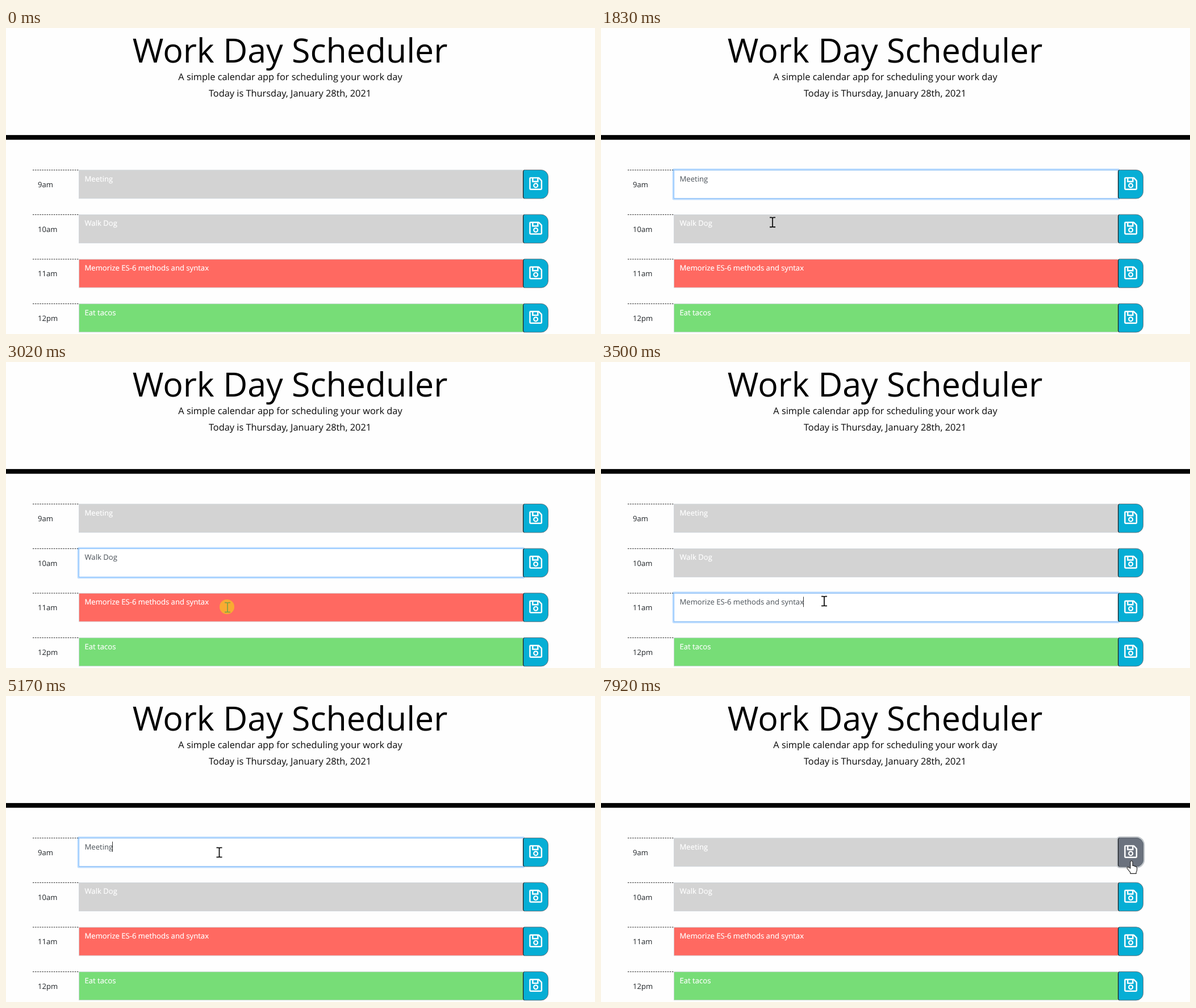
Write an HTML page that moves like this. It is 1037 px wide and 540 px high and loops after 7.99 s.

```html
<!DOCTYPE html>
<html lang="en">
<head>
<meta charset="utf-8">
<title>Work Day Scheduler</title>
<style>
  html, body { margin: 0; width: 100%; height: 100%; overflow: hidden; background: #fefefe; }
  svg { display: block; width: 1037px; height: 540px; }
  text { font-family: "Open Sans", "Noto Sans", sans-serif; font-size: 13.1px; text-rendering: geometricPrecision; }
  .head { text-anchor: middle; font-size: 16.38px; fill: #080808; }
  .title { font-size: 59px; fill: #000; }
  .hour { fill: #212529; }
  .task { stroke-width: .2; }
  .dash { stroke: #222; stroke-dasharray: 2.5 1.6; }
  .focus { fill: none; stroke: #80bdff; }
  .focus .ring { stroke: #007bff; stroke-opacity: .25; stroke-width: 2.6; }
  .box { stroke: #ced4da; stroke-width: .8; }
  .caret { fill: #333; }
  .btn { fill: #06aed5; stroke: #5f6b75; stroke-width: .9; }
  .hover { fill: #6b727e; stroke: #5f6670; stroke-width: .9; }
  .btnRing { fill: none; stroke: #bfc3c8; stroke-width: 5.6; }
  .edge { fill: none; stroke: #111; }
  .icon { fill: none; stroke: #fff; stroke-width: 48; }
  .beam { fill: none; stroke: #111; stroke-width: 1.8; }
  .hand, .arrow { fill: #fff; stroke: #222; stroke-width: 1.1; stroke-linejoin: round; }
</style>
</head>
<body>
<svg viewBox="0 0 1037 540">
  <defs>
    <path id="button" d="M913.4 0H942.2a12.3 12.3 0 0 1 12.3 12.3V38.2a12.3 12.3 0 0 1-12.3 12.3H913.4a2.6 2.6 0 0 1-2.6-2.6V2.6A2.6 2.6 0 0 1 913.4 0z"/>
    <g id="disk" class="icon" transform="translate(921.2 11) scale(.0512)">
      <path d="M48 56H316a24 24 0 0 1 17 7l84 84a24 24 0 0 1 7 17V432a24 24 0 0 1-24 24H48a24 24 0 0 1-24-24V80a24 24 0 0 1 24-24z"/>
      <path d="M120 56V184H296V56"/>
      <circle cx="224" cy="320" r="68" stroke-width="42"/>
    </g>
  </defs>
  <text class="head title" x="500" y="60.5">Work Day Scheduler</text>
  <text class="head" x="500.5" y="91.8">A simple calendar app for scheduling your work day</text>
  <text class="head" x="500" y="120.6">Today is Thursday, January 28th, 2021</text>
  <rect y="188.9" width="1037" height="8.3"/>
  <g id="rows"></g>
  <g id="cursor">
    <circle cx="-1" cy="-1" r="13" fill="#f9ab32"/>
    <path class="beam" d="M-5-8.4H-2Q0-8.4 0-7Q0-8.4 2-8.4H5M0-8V8M-5 8.4H-2Q0 8.4 0 7Q0 8.4 2 8.4H5"/>
    <path class="hand" d="M-2 2a2 2 0 0 1 4 0V8.5q2.8-.6 3.3 1q2-.4 2.5.9q1.8 0 1.8 2V16q0 2-1.4 4V22.4H-2V20.4L-6.8 14.5q-2-2.2-.4-3.4q1.6-1 5.2 2z"/>
    <path class="arrow" d="M0 0V16l3.8-3.5 2.6 6 2.4-1-2.6-5.8H11z"/>
  </g>
</svg>
<script>
const LOOP = 7990, STEP = 77, FADE = 150, BLINK = 525;
const TOP = 250.5, PITCH = 78.65, HEIGHT = 50.5, LEFT = 128, RIGHT = 910.5, BUTTON_END = 954.5;

const rows = [
  { hour: '9am', task: 'Meeting', color: '#d3d3d3' },
  { hour: '10am', task: 'Walk Dog', color: '#d3d3d3' },
  { hour: '11am', task: 'Memorize ES-6 methods and syntax', color: '#ff6961' },
  { hour: '12pm', task: 'Eat tacos', color: '#77dd77' }
];
const entry = { x: 984, y: 467 };
const moves = [
  { start: 470, end: 700, x: 328, y: 257 },
  { start: 880, end: 1830, x: 302, y: 343 },
  { start: 2130, end: 2690, x: 390, y: 433 },
  { start: 3070, end: 3500, x: 393, y: 422 },
  { start: 3500, end: 4120, x: 375.5, y: 276 },
  { start: 6380, end: 7070, x: 893, y: 290 },
  { start: 7180, end: 7500, x: 934, y: 291 }
];
const clicks = [
  { time: 1110, row: 0 }, { time: 2205, row: 1 }, { time: 3070, row: 2 },
  { time: 4120, row: 0 }, { time: 7660, save: 0 }
];

const clamp = v => Math.max(0, Math.min(1, v));
const ease = v => { const p = clamp(v); return p * p * (3 - 2 * p); };
const fade = (t, start) => ease((t - start) / FADE);
const $ = id => document.getElementById(id);
const show = (node, opacity) => { node.style.opacity = +opacity; };

$('rows').innerHTML = rows.map(({ hour, task }, i) => `
  <g transform="translate(0 ${TOP + i * PITCH})">
    <path class="dash" d="M47 .2H127.5"/>
    <text class="hour" x="56" y="30.5">${hour}</text>
    <rect class="box" x="128.4" y=".3" width="782" height="50"/>
    <g class="focus">
      <rect class="ring" x="126.9" y="-1.2" width="785" height="53" rx="1"/>
      <rect x="128.4" y=".3" width="782" height="50"/>
    </g>
    <text class="task" x="138.5" y="20.1">${task}</text>
    <rect class="caret" y="6.5" width="1" height="18"/>
    <use href="#button" class="btnRing"/>
    <use href="#button" class="btn"/>
    <use href="#button" class="hover"/>
    <path class="edge" d="M912.3 .2Q910.6 .8 910.6 3V47.5Q910.6 49.7 912.3 50.3"/>
    <use href="#disk"/>
  </g>`).join('');

const parts = [...$('rows').children].map(node => {
  const part = name => node.querySelector('.' + name);
  part('caret').setAttribute('x', Math.floor(138.5 + part('task').getComputedTextLength() - .5));
  return part;
});
const [spot, beam, hand, arrow] = $('cursor').children;

// The pointer advances in discrete steps counted from the start of each move.
function pointerAt(t) {
  const i = moves.findLastIndex(m => m.start <= t);
  if (i < 0) return null;
  const from = moves[i - 1] || entry, { start, end, x, y } = moves[i];
  const elapsed = Math.floor((t - start) / STEP) * STEP;
  const p = ease((elapsed + 3) / (end - start));
  const at = { x: from.x + (x - from.x) * p, y: from.y + (y - from.y) * p };
  const inRow = at.y > TOP && (at.y - TOP) % PITCH < HEIGHT;
  at.overText = inRow && at.x > LEFT && at.x <= RIGHT;
  at.overButton = inRow && at.x > RIGHT && at.x < BUTTON_END;
  return at;
}

function drawRow(part, i, t) {
  const latest = clicks.findLastIndex(c => c.time <= t);
  const current = clicks[latest];
  const active = current?.row === i;
  const wasActive = clicks[latest - 1]?.row === i;
  const saved = current?.save === i;
  const glow = active ? fade(t, current.time) : wasActive ? 1 - fade(t, current.time) : 0;
  const blinkOn = active && Math.floor((t - current.time + 45) / BLINK) % 2 === 0;

  part('box').style.fill = active ? '#fff' : rows[i].color;
  part('task').style.fill = active ? '#495057' : '#fff';
  part('task').style.stroke = active ? 'none' : '#fff';
  show(part('focus'), glow);
  show(part('caret'), blinkOn);
  show(part('btnRing'), saved ? fade(t, current.time) : 0);
  show(part('hover'), i === 0 ? fade(t, moves.at(-1).start + STEP) : 0);
}

function drawPointer(t) {
  const at = pointerAt(t);
  show($('cursor'), at !== null);
  if (!at) return;
  const clicking = clicks.some(({ time }) => t >= time - 50 && t < time);
  $('cursor').setAttribute('transform', `translate(${at.x} ${at.y})`);
  show(spot, clicking);
  show(beam, at.overText);
  show(hand, at.overButton);
  show(arrow, !at.overText && !at.overButton);
  beam.style.stroke = clicking ? '#84a344' : '#111';
}

function draw() {
  const t = (performance.now() + .5) % LOOP;
  parts.forEach((part, i) => drawRow(part, i, t));
  drawPointer(t);
  requestAnimationFrame(draw);
}
draw();
</script>
</body>
</html>
```
